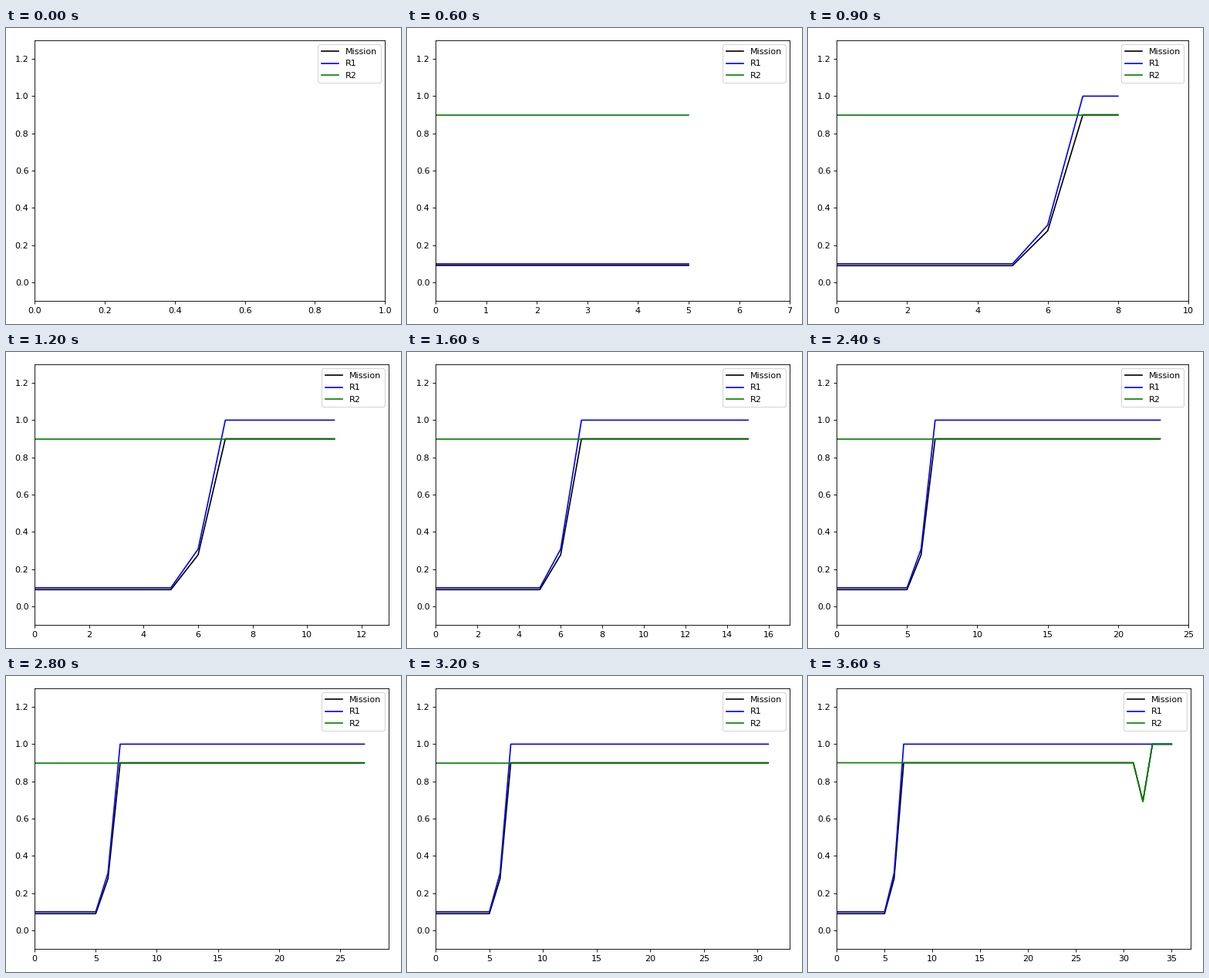
These frames come from a looping animation (512 by 384 pixels, 3700 ms). A matplotlib script:

```python
import numpy as np
import matplotlib.pyplot as plt
from matplotlib.animation import FuncAnimation

STEPS = 37
INTERVAL = 100
DPI = 80
WIDTH, HEIGHT = 512, 384

# Outer padding plus the length of a tick, in pixels.
MARGIN = (1.08 * 10 + 3.5) * DPI / 72
LEFT = 37.2

fig, ax = plt.subplots(figsize=(WIDTH / DPI, HEIGHT / DPI), dpi=DPI)

# Each reliability holds a level, passes through one estimate, then reaches 1.
t = np.arange(STEPS - 1)
r1 = np.select([t < 6, t == 6], [0.1, 4 / 13], 1.0)
r2 = np.select([t < 32, t == 32], [0.9, 9 / 13], 1.0)
SERIES = (
    ("Mission", r1 * r2, "black"),
    ("R1", r1, "blue"),
    ("R2", r2, "green"),
)


def fit_axes():
    """Fit the tick labels, keeping room for a tick at the top and right."""
    fig.subplots_adjust(left=0.125, right=0.9, bottom=0.11, top=0.88)
    fig.tight_layout()
    right = min(fig.subplotpars.right, 1 - MARGIN / WIDTH)
    fig.subplots_adjust(left=LEFT / WIDTH, right=right,
                        top=1 - MARGIN / HEIGHT)


def update(i):
    ax.clear()
    for label, values, color in SERIES:
        ax.plot(t[:i], values[:i], color=color, label=label)
    ax.set_xlim(0, i + 1)
    ax.set_ylim(-0.1, 1.3)
    ax.legend(loc="upper right")
    fit_axes()
    return ax.lines


anim = FuncAnimation(fig, update, frames=STEPS, interval=INTERVAL,
                     init_func=lambda: [], repeat=True, repeat_delay=0)
plt.show()
```
